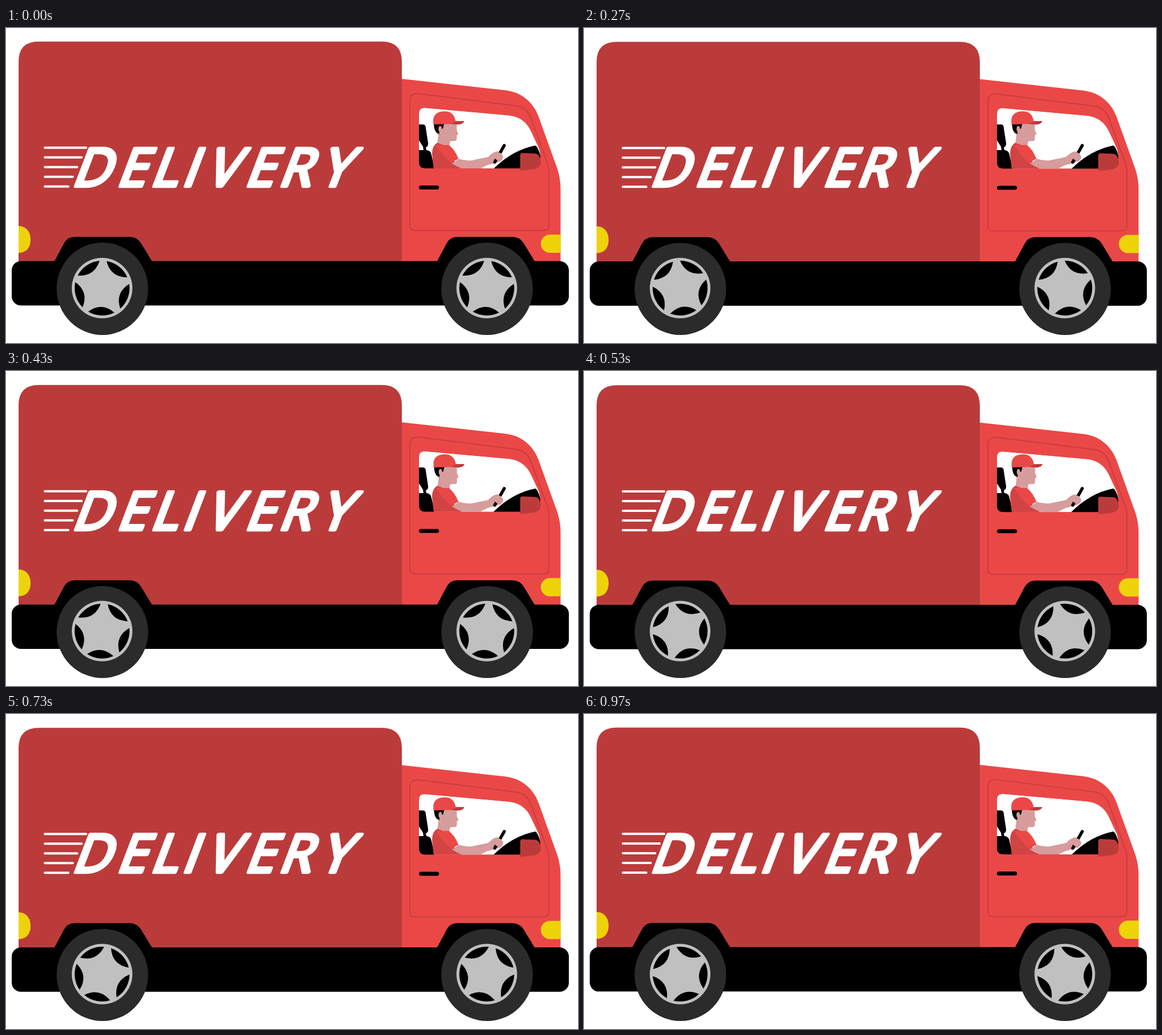
Animation of 1000 by 552 pixels, one loop 1010 ms. Source, as an HTML page with a canvas:

```html
<!DOCTYPE html>
<html lang="en">
<head>
<meta charset="utf-8">
<title>Delivery van</title>
<style>
html, body { margin: 0; width: 100%; height: 100%; overflow: hidden; background: #fff; }
canvas { display: block; }
</style>
</head>
<body>
<canvas id="stage" width="1000" height="552"></canvas>
<script>
const ctx = document.getElementById('stage').getContext('2d');
const LOOP = 1010, FRAMES = 30, TAU = Math.PI * 2;
const RED = '#bb3b3b', CAB = '#ea4847', LINE = '#c93d3f', YELLOW = '#eed30a';
const SKIN = '#d79c9c', GREY = '#c0c0c0', TYRE = '#2b2b2b';

const box = new Path2D('M22 409V59Q22 23.7 57 23.7H657Q692 23.7 692 59V409Z');
const cab = new Path2D('M691 89L872 109C899 112 920 127 931 155L964 247Q969.5 264 969.5 282V409H691Z');
const door = new Path2D('M706 129Q706 114 721 115L889 136Q911 138 918 159L947 238Q949 243 949 249V346Q949 355 940 355H715Q706 355 706 346Z');
const pane = new Path2D('M722 150Q722 139 733 140L878 153C899 155 911 166 918 181L932 211Q940 246 918 246H733Q722 246 722 235Z');
const mirror = new Path2D('M899 223Q899 219 903 219L926 220Q933 221 935 234Q936 246 918 248L899 250Z');
const arch = new Path2D('M84 410L101 378Q107 366 120 366H216Q229 366 236 377L256 410Z');
const tail = new Path2D('M22 347C35 347 43 357 43 371C43 385 35 394 22 394Z');
const head = new Path2D('M970 362H951A16 16 0 0 0 951 394H970Z');

const headrest = new Path2D('M722 169H729Q734 169 734 176L738 202Q738 208 734 209L735 215H730L729 208L722 197Z');
const seat = new Path2D('M722 214H736Q743 215 744 223L750 250H722Z');
const dash = new Path2D('M850 249Q884 214 925 206Q932 207 940 250Z');
const shirt = new Path2D('M754 201Q744 207 745 222L748 250H800L784 234L772 208Z');
const sleeve = new Path2D('M752 205L774 205Q784 212 791 229L779 236Q765 226 752 205Z');
const arm = new Path2D('M779 237Q787 234 791 229Q802 233 814 232L843 226Q851 217 859 216L869 224Q870 230 864 234L854 237L842 240L826 248H802Q789 244 779 237Z');
const face = new Path2D('M756 185L764 167H788L788 179L791 186L788 188V195Q787 199 781 198L776 199L775 207Q763 206 754 202Z');
const hair = new Path2D('M748 167H766L764 176L759 178L757 186Q748 183 748 167Z');
const cap = new Path2D('M747 169V161C748 149 758 146 767 146C778 146 784 152 786 163H801Q798 169 787 168Z');
const brim = new Path2D('M777 168L787 164L801 163Q799 170 787 169Z');

function fill(path, color) {
  ctx.fillStyle = color;
  ctx.fill(path);
}

function line(x1, y1, x2, y2, width, color) {
  ctx.lineCap = 'round';
  ctx.lineWidth = width;
  ctx.strokeStyle = color;
  ctx.beginPath();
  ctx.moveTo(x1, y1);
  ctx.lineTo(x2, y2);
  ctx.stroke();
}

function oval(x, y, rx, ry, color) {
  ctx.fillStyle = color;
  ctx.beginPath();
  ctx.ellipse(x, y, rx, ry, 0, 0, TAU);
  ctx.fill();
}

function lettering() {
  for (let i = 0; i < 5; i++) {
    const y = 209.8 + i * 17;
    line(68, y, 140 - i * 7.8, y, 4, '#fff');
  }
  // plain weight, slanted and thickened by a round outline
  const pen = [113, 191, 250, 305, 346.5, 415, 474, 545.5];
  ctx.save();
  ctx.transform(1, 0, -0.38, 1, 0, 276.8);
  ctx.font = '92px "Open Sans", sans-serif';
  ctx.fillStyle = ctx.strokeStyle = '#fff';
  ctx.lineJoin = 'round';
  ctx.lineWidth = 6.5;
  [...'DELIVERY'].forEach((letter, i) => {
    ctx.fillText(letter, pen[i], 0);
    ctx.strokeText(letter, pen[i], 0);
  });
  ctx.restore();
}

function driver(sway) {
  fill(headrest, '#000');
  fill(seat, '#000');
  fill(dash, '#000');
  ctx.save();
  ctx.translate(sway, 0);
  fill(face, SKIN);
  fill(hair, '#000');
  oval(759, 177, 3, 5.5, SKIN);
  fill(cap, CAB);
  fill(brim, RED);
  ctx.restore();
  fill(shirt, '#d24344');
  fill(sleeve, CAB);
  fill(arm, SKIN);
  line(871, 206, 854.5, 235, 5.5, '#000');
  oval(861, 225, 7, 7, SKIN);
}

function body(bob) {
  ctx.save();
  ctx.translate(0, bob);
  fill(cab, CAB);
  fill(box, RED);
  lettering();
  ctx.lineWidth = 2;
  ctx.strokeStyle = LINE;
  ctx.stroke(door);

  ctx.save();
  ctx.clip(pane);
  fill(pane, '#fff');
  ctx.translate(0, -bob);
  driver(bob * 0.5);
  ctx.restore();

  fill(mirror, RED);
  line(725.5, 279.5, 753.5, 279.5, 7, '#000');
  fill(tail, YELLOW);
  fill(head, YELLOW);
  fill(arch, '#000');
  ctx.save();
  ctx.translate(669, 0);
  fill(arch, '#000');
  ctx.restore();
  ctx.fillStyle = '#000';
  ctx.beginPath();
  ctx.roundRect(10, 408.5, 974, 77.7, 16);
  ctx.fill();
  ctx.restore();
}

function wheel(x, angle, bob) {
  oval(x, 457 + bob / 2, 80, 81 - bob / 2, TYRE);
  ctx.save();
  ctx.translate(x - 0.5, 455.8);
  oval(0, 0, 53, 53, GREY);
  ctx.rotate(angle);
  ctx.fillStyle = '#000';
  // five openings between the spokes
  const r = 48, half = 0.5;
  for (let i = 0; i < 5; i++) {
    ctx.beginPath();
    ctx.arc(0, 0, r, -half, half);
    ctx.quadraticCurveTo(24, 0, r * Math.cos(half), -r * Math.sin(half));
    ctx.fill();
    ctx.rotate(TAU / 5);
  }
  ctx.restore();
}

function draw(time) {
  // 30 steps a second on a 10 ms clock
  const tick = Math.floor((time % LOOP) / 10) * 10 + 5;
  const step = Math.min(FRAMES - 1, Math.floor(tick * 0.03));
  const bob = 0.65 * (1 - Math.cos(TAU * step / 10));
  const angle = (20 + step * 16.8) * Math.PI / 180;
  ctx.clearRect(0, 0, 1000, 552);
  body(bob);
  wheel(168.5, angle, bob);
  wheel(841, angle, bob);
}

const start = performance.now();
function loop() {
  draw(performance.now() - start);
  requestAnimationFrame(loop);
}
loop();
</script>
</body>
</html>
```
